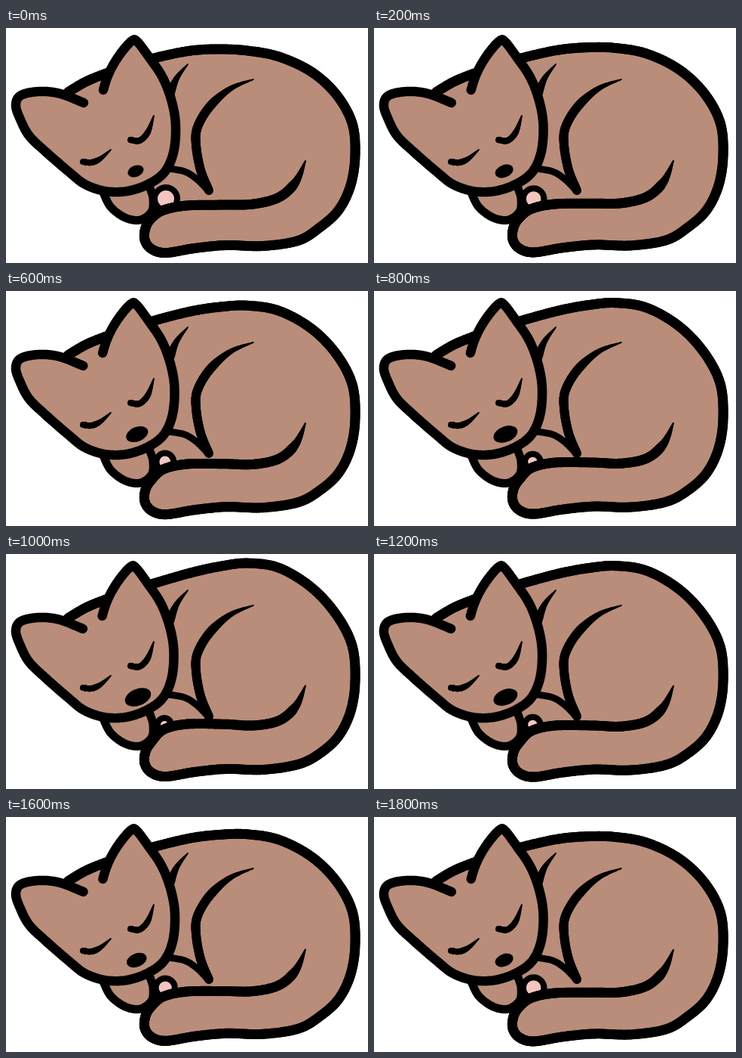
Animation of 480 by 311 pixels, one loop 2000 ms. Source, as an HTML page with a canvas:

```html
<!DOCTYPE html>
<html lang="en">
<head>
<meta charset="utf-8">
<title>Sleeping cat</title>
<style>
  html, body { margin: 0; width: 100%; height: 100%; overflow: hidden; background: #fff; }
  canvas { display: block; width: 480px; height: 311px; }
</style>
</head>
<body>
<canvas id="stage" width="480" height="311"></canvas>
<script>
const ctx = document.getElementById('stage').getContext('2d');
const FUR = '#b98d79', PINK = '#f2c5c1', INK = '#000', LINE = 13;
const STEP = 200, STEPS = 10;

// Key points of the cat breathed out, as x,y pairs
const back = [82,85, 106,71, 133,60, 165,49, 200,39, 245,30, 283,28, 320,30,
  362,38, 405,58, 438,88, 459,126, 463,168, 457,208, 441,241, 416,264];
const under = [387,280, 340,287, 292,286, 250,290, 212,296, 193,291, 184,279, 185,263, 193,250];
const tailTop = [209,241, 240,235, 290,234, 328,233, 362,224, 384,204, 397,176];
const head = [103,99, 72,87, 45,84, 20,89, 13,102, 19,121, 31,143, 54,165, 83,190, 105,207,
  132,216, 160,216, 188,207, 210,191, 222,165, 225,130, 220,98, 208,66,
  190,39, 174,18, 167,17, 154,31, 142,49, 134,66, 129,82];
const hip = [269,215, 258,188, 252,155, 254,131, 271,103, 298,80, 328,68];
const shoulder = [216,91, 226,67, 241,48];
const arm = [215,186, 237,190, 253,200, 267,214];
const paw = [129,218, 139,237, 158,251, 178,254, 193,243, 195,226, 191,212];
const eyes = [[102,177, 113,178, 125,173, 139,161], [165,148, 177,149, 188,138, 196,116]];

const mix = (a, b, k) => a + (b - a) * k;
const bell = (x, mid, width) => Math.exp(-(((x - mid) / width) ** 2));

// Moves every point by move(x, y), which returns the new pair
function moved(flat, move) {
  const out = [];
  for (let i = 0; i < flat.length; i += 2) out.push(...move(flat[i], flat[i + 1]));
  return out;
}

// Samples a smooth curve through the points
function curve(flat) {
  const n = flat.length / 2, out = [];
  const at = i => {
    const k = 2 * Math.max(0, Math.min(n - 1, i));
    return [flat[k], flat[k + 1]];
  };
  for (let i = 0; i < n - 1; i++) {
    const p = [at(i - 1), at(i), at(i + 1), at(i + 2)];
    for (let s = 0; s < 12; s++) {
      const t = s / 12;
      out.push([0, 1].map(k => {
        const [a, b, c, d] = p.map(q => q[k]);
        return b + .5 * t * (c - a + t * (2 * a - 5 * b + 4 * c - d + t * (3 * (b - c) + d - a)));
      }));
    }
  }
  out.push(at(n - 1));
  return out;
}

function trace(pts) {
  ctx.beginPath();
  pts.forEach(p => ctx.lineTo(p[0], p[1]));
}

function fill(flat, color) {
  trace(curve(flat));
  ctx.fillStyle = color;
  ctx.fill();
}

function line(flat, width = LINE) {
  trace(curve(flat));
  ctx.lineWidth = width;
  ctx.stroke();
}

// Stroke that thins out over the given length before its end
function brush(flat, width, length) {
  const pts = curve(flat);
  let left = 0;
  for (let i = pts.length - 1; i > 0; i--) {
    const a = pts[i], b = pts[i - 1];
    left += Math.hypot(a[0] - b[0], a[1] - b[1]);
    ctx.lineWidth = mix(1.5, width, Math.min(1, left / length));
    trace([a, b]);
    ctx.stroke();
  }
}

function ellipse(x, y, rx, ry, turn) {
  ctx.beginPath();
  ctx.ellipse(x, y, rx, ry, turn, 0, Math.PI * 2);
  ctx.fill();
}

// breath runs from 0 (out) to 1 (in)
function draw(breath) {
  ctx.fillStyle = '#fff';
  ctx.fillRect(0, 0, 480, 311);
  ctx.lineCap = ctx.lineJoin = 'round';
  ctx.strokeStyle = INK;

  const top = moved(back, (x, y) => [x, y < 150 ? y - 20 * breath * bell(x, 350, 90) : y]);
  const low = moved(under, (x, y) => [x, y + mix(1.5, -1.5, breath)]);
  const tail = moved(tailTop, (x, y) => [x, y - 10 * breath * bell(x, 250, 110)]);
  const face = moved(head, (x, y) => [x - .012 * breath * (x - 13), y]);

  fill([...top, ...low], FUR);
  brush(shoulder, 12, 46);
  brush(hip, 12, 65);
  line(arm, 9);
  fill(paw, FUR);
  line(paw, 11);

  ctx.fillStyle = PINK;
  ctx.lineWidth = 8;
  ctx.beginPath();
  ctx.arc(mix(212, 210, breath), 226, mix(15, 9, breath), 0, Math.PI * 2);
  ctx.fill();
  ctx.stroke();

  fill([...low, ...tail], FUR);
  brush([...top, ...low, ...tail], LINE, 40);

  fill(face, FUR);
  line(face, 12.5);
  eyes.forEach(eye => brush(eye, 8, 26));
  ctx.fillStyle = INK;
  ellipse(mix(172, 175, breath), 189.5, mix(11, 18, breath), mix(7.5, 11, breath), -.38);
}

const start = performance.now();
let shown = -1;
function tick() {
  const step = Math.floor((performance.now() - start) / STEP) % STEPS;
  if (step !== shown) {
    shown = step;
    draw(1 - Math.abs(step * 2 / STEPS - 1));
  }
  requestAnimationFrame(tick);
}
tick();
</script>
</body>
</html>
```
